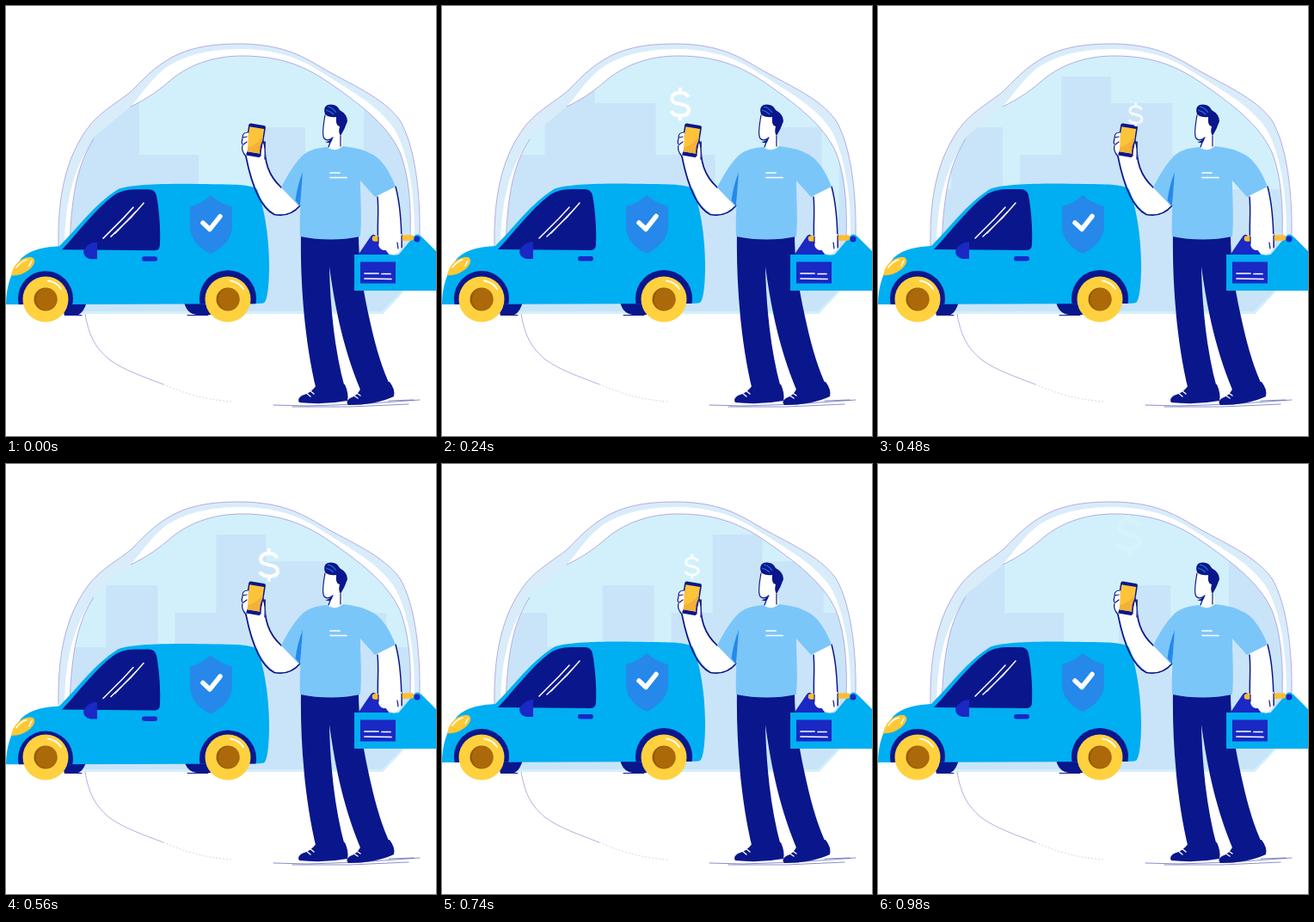
An HTML page that plays this animation: 500 px wide and 500 px high, repeating every 1 s.

```html
<!DOCTYPE html>
<html lang="en">
<head>
<meta charset="utf-8">
<title>Service van</title>
<style>
html, body { margin: 0; width: 100%; height: 100%; overflow: hidden; background: #fff; }
svg { display: block; width: 100vw; height: 100vh; }
.navy { fill: #0a168c; }
.ink { stroke: #0a168c; fill: none; stroke-linecap: round; stroke-linejoin: round; }
.cyan { fill: #00aef2; }
.blue { fill: #1a28c4; }
.shirt { fill: #7bc6f9; }
.white { fill: #fff; }
.chalk { stroke: #fff; fill: none; stroke-linecap: round; stroke-linejoin: round; }
.rim { fill: none; stroke: #aea4dc; stroke-width: .9; }
.coin { fill: none; stroke: #fff; stroke-width: 4.4; }
</style>
</head>
<body>
<svg viewBox="0 0 500 500">
  <defs>
    <clipPath id="scene">
      <path d="M68 290C69 230 78 190 101 153L145 117C164 108 176 99 187 90C210 69 240 58 275 58C322 58 350 72 374 88C410 113 443 137 458 170C470 200 471 240 470 270L466 328L438 358H88Z"/>
    </clipPath>
    <clipPath id="bodyClip">
      <path d="M0 347C0 326 6 308 18 293C30 282 46 280 62 279C85 256 103 230 130 213C146 206 200 206 240 207C270 207 287 208 292 213C302 238 306 275 306 300C306 325 304 342 300 345Q296 346 284 346Z"/>
    </clipPath>
    <g id="wheel">
      <circle r="26.5" fill="#ffd13f"/>
      <circle r="13.5" fill="#935a09"/>
      <ellipse cx="1.2" rx="12.3" ry="13" fill="#ab690a"/>
      <path d="M3-21.500Q13-20 18-12" class="chalk" stroke-width="1.8"/>
    </g>
    <path id="dollar" d="M10-8.500C8-12 4-14 0-14C-6-14-10-11-10-7C-10-2-6-1.200 0 0C6 1.200 10.500 2.500 10.500 7.500C10.500 12 6 14 0 14C-5 14-9 12-11 8.500M0-20V-14M0 14V20"/>
  </defs>

  <!-- backdrop -->
  <path fill="#d9ecfa" d="M61 285C60 225 68 176 98 138C112 121 132 111 147 98C163 81 180 64 205 54C228 45 252 44 275 44C320 45 343 57 366 71C400 91 439 106 458 133C476 163 482 220 481 275Z"/>
  <path class="rim" d="M61 280C60 225 68 176 98 138C112 121 132 111 147 98C163 81 180 64 205 54C228 45 252 44 275 44C320 45 343 57 366 71C400 91 439 106 458 133C476 163 482 220 481 268"/>
  <path class="white" d="M145 117C158 103 168 84 190 69C215 54 245 50 275 50C322 51 347 64 370 79C405 101 438 119 454 147C470 180 476 225 475 275H470C471 230 470 200 458 170C443 137 410 113 374 88C350 72 322 58 275 58C240 58 210 69 187 90C176 99 164 108 145 117Z"/>
  <g clip-path="url(#scene)">
    <rect width="500" height="360" fill="#d2f0fb"/>
    <path id="city" fill="#c9e4f9"/>
    <path d="M88 357H438L467 328" fill="none" stroke="#d2f0fb" stroke-width="4"/>
  </g>
  <path class="white" d="M102 155C84 182 76 217 74 285H68C68 235 76 190 102 155Z"/>
  <path class="rim" d="M145 117C164 108 176 99 187 90C210 69 240 58 275 58C322 58 350 72 374 88C410 113 443 137 458 170C470 200 471 240 470 268M102 155C84 182 76 217 74 280"/>
  <path class="rim" d="M92 358C96 382 103 397 120 411C138 424 160 431 183 440"/>
  <path class="rim" opacity=".5" stroke-dasharray="2 2" d="M183 440C205 449 225 457 262 460"/>

  <!-- van -->
  <path class="navy" d="M64 344H94Q90 358 82 360H68ZM207 344H238V359H222Q210 358 207 344Z"/>
  <path d="M70 359.500H88M211 359.500H235" class="ink" stroke-width="1"/>
  <g id="van">
    <g clip-path="url(#bodyClip)">
      <rect class="cyan" y="200" width="310" height="150"/>
      <circle class="navy" cx="46" cy="340" r="32"/>
      <circle class="navy" cx="258" cy="340" r="33"/>
    </g>
    <path class="navy" d="M65 283C85 262 104 236 124 221Q134 213 150 213H166Q173 213 175 220C178 236 180 260 179 277Q179 284 173 284Z"/>
    <path class="chalk" stroke-width="1.5" d="M113 270L136 247L148 234M122 268L145 246L160 229M127 264L151 239"/>
    <path class="blue" d="M106 274V294H98Q90 292 90 285Q94 275 106 274Z"/>
    <rect class="blue" x="158" y="291" width="18" height="5.500" rx="2.700"/>
    <path fill="#ffc834" d="M6 313C8 301 18 291 30 292C36 294 33 302 26 307C19 312 12 314 6 313Z"/>
    <path class="chalk" stroke-width="1.5" d="M12 304Q17 297 24 295M27 302L30 296"/>
    <path fill="#2688ea" d="M238 220Q250 230 263 233V255C263 271 252 281 238 288C224 281 214 271 214 255V233Q227 230 238 220Z"/>
    <path class="chalk" stroke-width="5.500" d="M229 252L237 259.500L249 244.500"/>
  </g>
  <use href="#wheel" x="46" y="341"/>
  <use href="#wheel" x="258" y="341"/>

  <!-- ground -->
  <path class="ink" stroke-width=".8" opacity=".6" d="M311 464L350 465L410 463L481 458M333 466L400 466L468 463M445 459L474 458"/>

  <!-- legs -->
  <path class="navy" d="M343 264H410C410 300 415 330 424 370Q434 415 447 442L412 446C398 412 385 370 376 303C377 350 382 400 394 444L361 447C347 390 342 320 343 264Z"/>
  <path class="navy" d="M361 441L394 440Q399 451 397 459Q370 464 341 461Q338 457 344 453Q355 450 361 441ZM413 442L446 437Q453 446 451 454Q430 464 398 464Q394 460 400 456Q411 452 413 442Z"/>
  <path class="chalk" stroke-width="1.4" d="M348 449L354 454M352 446L358 451M403 452L409 456M406 449L412 453"/>

  <!-- raised arm -->
  <path class="white" d="M277 172L302 160C301 180 304 194 320 211L342 232Q332 246 317 243C297 235 287 203 277 172Z"/>
  <path class="ink" stroke-width="1.7" d="M279 175C285 205 295 234 312 242.500Q330 246 342 232M301 158C300 181 305 197 320 211"/>

  <!-- lowered arm -->
  <path class="white" d="M431 220L453 209C459 230 461 256 460 281L452 289L440 286L433 277C431 255 434 240 431 220Z"/>
  <path class="ink" stroke-width="1.5" d="M432 222C434 240 431 258 433 276M453 210C459 232 460 255 460 280"/>

  <!-- head and shirt -->
  <path class="white" d="M371 125C369 137 367 150 370 154Q374 158 378 155L375 168H393L389 145L388 125Z"/>
  <path class="ink" stroke-width="1.2" d="M371 127C369 138 367 150 370 154Q374 158 380 153M378 156L375 164M389 151V163"/>
  <path class="navy" d="M371 158Q376 158 380 153Q379 160 374 159Z"/>
  <path class="navy" d="M371 126Q368 118 374 115Q384 113 388 121Q397 126 397 134Q394 143 389 151Q386 147 388 140Q383 140 384 129Q376 130 371 126Z"/>
  <path fill="none" stroke="#1b77d8" stroke-width="1.2" d="M374 117Q380 118 384 124M372 121Q377 122 381 126"/>
  <path class="shirt" d="M373 164Q382 171 392 163Q413 165 427 173Q442 182 453 210L429 222L412 203C412 225 414 248 412 268Q378 275 342 268C341 250 343 222 344 194L341 233L320 211Q334 183 347 172Q357 165 373 164Z"/>
  <path fill="#2688ea" d="M345 193Q339 208 336.500 226L342 233Z"/>
  <path class="chalk" stroke-width="1.7" d="M377 194H388M377 199.500H396"/>

  <!-- phone and hand -->
  <g transform="rotate(9 289.500 156)">
    <rect class="navy" x="279.500" y="137.500" width="20" height="37.500" rx="2.500"/>
    <rect fill="#fdc43a" x="281" y="141.500" width="17" height="29"/>
    <path fill="#f3b139" d="M298 150V170.500H281V166Q291 163 298 150Z"/>
  </g>
  <path class="white" d="M282 147Q275 147 274 153Q276 157 274 160Q273 165 275 168L279 174L281 166Z"/>
  <path class="ink" stroke-width="1.2" d="M281 147Q275 147 275 153L280 152M275 154Q273 161 276 161L280 158M275 162Q273 168 279 175"/>
  <path class="white" d="M299 158Q303 164 301 180L295 178Z"/>
  <path class="ink" stroke-width="1.3" d="M296 174Q295 163 299 157Q302 164 301 178"/>

  <!-- toolbox -->
  <path class="blue" d="M409 290L424 268Q428 263 431 269L446 290Z"/>
  <path class="cyan" d="M456 290L474 268Q478 263 483 268L500 285V290Z"/>
  <path fill="none" stroke="#ffbd32" stroke-width="6.500" stroke-linecap="round" d="M429 270.500L471 269.500"/>
  <circle class="blue" cx="478" cy="271" r="3.500"/>
  <path class="white" d="M433 266L460 265V281Q456 289 451 288L446 284L439 284Q433 283 433 275Z"/>
  <path class="ink" stroke-width="1.2" d="M433 268V276M460 267V281M455 275L456 282"/>
  <path class="cyan" d="M405 289H446Q452 291 460 288H500V331H405Z"/>
  <rect class="blue" x="412" y="297.500" width="41" height="25"/>
  <path class="chalk" stroke-width="1.7" d="M417 311H433M417 317L448 317.500M437 311.500H447"/>

  <g id="coins"></g>
</svg>
<script>
const LOOP = 1000, SPAN = 390;
// width, top of each block, left to right
const blocks = [[58, 82], [71, 113], [69, 173], [64, 213], [60, 141], [20, 245], [48, 173]];
// birth time, start x, start y, speed x, speed y
const coins = [[30, 286, 147, -.043, -.157], [350, 290, 141, .075, -.113], [605, 290, 140, .005, -.155]];
const LIFE = 390;
const city = document.getElementById("city");
const van = document.getElementById("van");
const layer = document.getElementById("coins");

function skyline() {
  let x = -SPAN, d = `M${x} 360`;
  for (let n = 0; n < 3; n++)
    for (const [w, top] of blocks) d += `V${top}H${x += w}`;
  return d + "V360Z";
}
city.setAttribute("d", skyline());

const signs = coins.map(() => {
  const el = document.createElementNS("http://www.w3.org/2000/svg", "use");
  el.setAttribute("class", "coin");
  el.setAttribute("href", "#dollar");
  return layer.appendChild(el);
});

function drawCoin(el, [birth, x, y, vx, vy], time) {
  const age = time - birth;
  const fade = Math.min(age / 150, (LIFE - age) / 150, 1);
  const scale = Math.min(48, 10 + .135 * Math.max(0, age)) / 40;
  el.setAttribute("opacity", Math.max(0, fade) * .95);
  el.setAttribute("transform", `translate(${x + vx * age} ${y + vy * age}) scale(${scale})`);
}

function draw(now) {
  const time = Math.floor((now % LOOP) / 20) * 20;
  const shift = (26 + SPAN * time / LOOP) % SPAN;
  city.setAttribute("transform", `translate(${shift} 0)`);
  const bob = 3.8 * Math.sin(Math.PI * (time + 15) / 250) ** 2;
  van.setAttribute("transform", `translate(0 ${bob})`);
  signs.forEach((el, i) => drawCoin(el, coins[i], time));
}

const start = performance.now();
function tick() {
  draw(performance.now() - start);
  requestAnimationFrame(tick);
}
tick();
</script>
</body>
</html>
```
